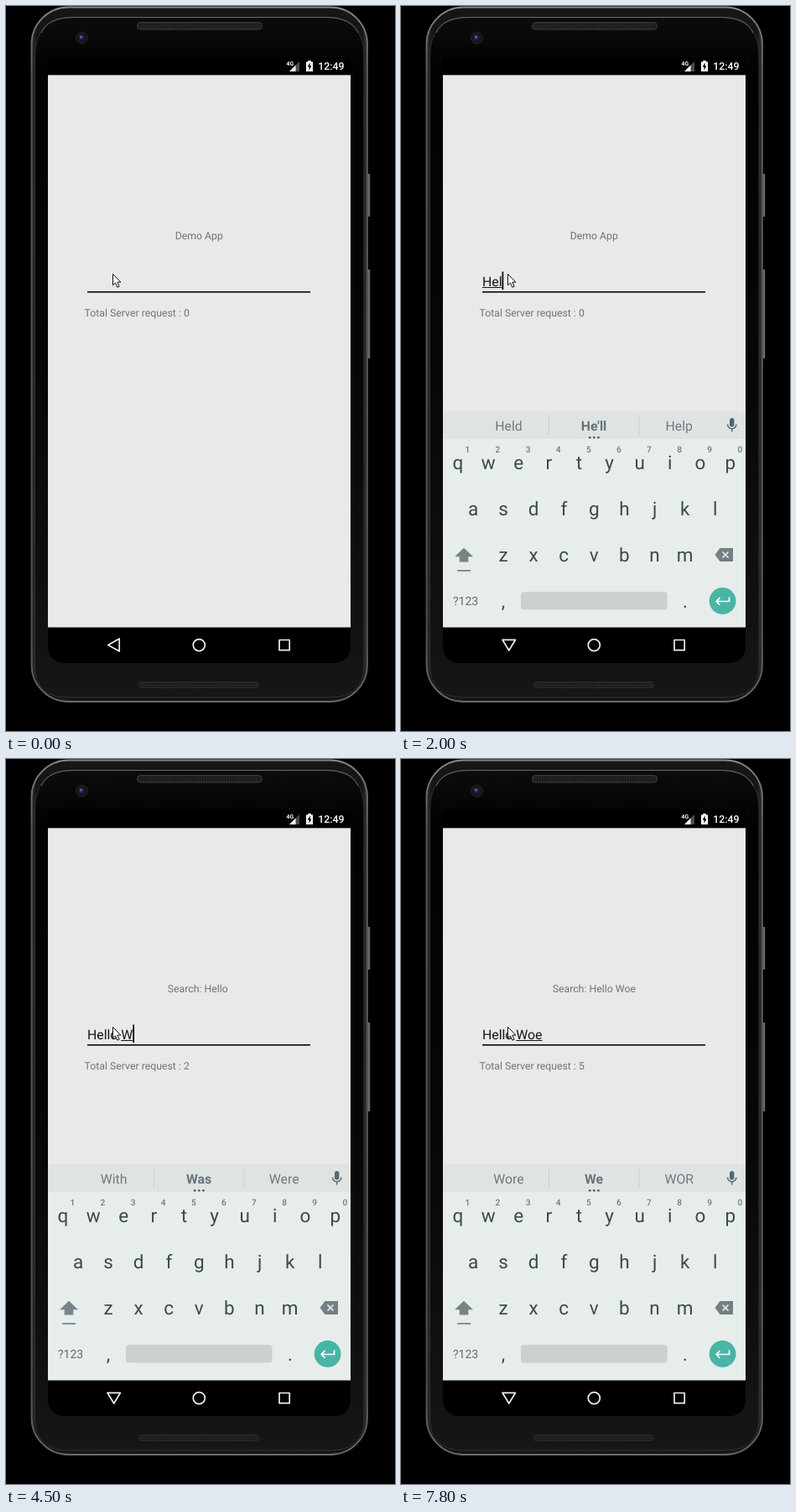
Write an HTML page that moves like this. It is 464 px wide and 864 px high and loops after 8 s.

```html
<!DOCTYPE html>
<html lang="en">
<head>
<meta charset="utf-8">
<title>Search field demo</title>
<style>
  html, body { margin: 0; width: 100%; height: 100%; overflow: hidden; background: #000; }
  svg { display: block; font-family: Roboto, sans-serif; text-rendering: geometricPrecision; }
  .label { font-size: 12.29px; fill: #737372; }
  .input { font-size: 15.8px; fill: #161616; }
  .sug { font-size: 15.8px; fill: #6d7a7f; text-anchor: middle; }
  .sug.main { font-weight: 700; fill: #64737a; }
  .key { font-size: 22.5px; fill: #3a4a51; text-anchor: middle; }
  .hint { font-size: 10.2px; font-weight: 500; fill: #6f7b80; text-anchor: middle; }
  .nav { fill: none; stroke: #efefef; stroke-width: 1.7; stroke-linejoin: round; }
</style>
</head>
<body>
<svg width="464" height="864" viewBox="0 0 464 864">
  <defs>
    <linearGradient id="body" x2="0" y2="1">
      <stop offset="0" stop-color="#0c0c0c"/>
      <stop offset=".08" stop-color="#020202"/>
      <stop offset=".5" stop-color="#060606"/>
      <stop offset=".85" stop-color="#10100e"/>
      <stop offset="1" stop-color="#161614"/>
    </linearGradient>
    <linearGradient id="side">
      <stop offset="0" stop-color="#303030"/>
      <stop offset=".015" stop-color="#161616"/>
      <stop offset=".985" stop-color="#161616"/>
      <stop offset="1" stop-color="#3a3a3a"/>
    </linearGradient>
    <linearGradient id="rim" x2="0" y2="1">
      <stop offset="0" stop-color="#858585"/>
      <stop offset=".1" stop-color="#5a5a5a"/>
      <stop offset=".9" stop-color="#525252"/>
      <stop offset="1" stop-color="#6a6a68"/>
    </linearGradient>
    <pattern id="mesh" width="3" height="3" patternUnits="userSpaceOnUse">
      <rect width="3" height="3" fill="#262624"/>
      <rect width="1.5" height="1.5" fill="#10100f"/>
    </pattern>
  </defs>

  <!-- phone -->
  <rect x="431.500" y="200" width="2.800" height="51" rx="1" fill="#686868"/>
  <rect x="431.500" y="314" width="2.800" height="106" rx="1" fill="#686868"/>
  <rect x="30.500" y="1.500" width="400.500" height="827.500" rx="44" fill="url(#side)" stroke="url(#rim)" stroke-width="1.800"/>
  <path d="M34.500 60Q34.500 14 80 13.500H382Q427 14 427 60V786Q427 824 386 824H75Q34.500 824 34.500 786Z" fill="url(#body)" stroke="#303030"/>
  <path d="M42 32Q50 13.500 80 13.500H382Q412 13.500 420 32" fill="none" stroke="#6a6a6a"/>
  <rect x="156.500" y="19.500" width="149" height="8.500" rx="4" fill="url(#mesh)" stroke="#3a3a38"/>
  <rect x="158.500" y="805.500" width="143" height="7" rx="3" fill="url(#mesh)" stroke="#2b2b29"/>
  <circle cx="90.500" cy="38" r="7" fill="#15161b" stroke="#222226"/>
  <circle cx="90" cy="37.500" r="3.500" fill="#1d2340"/>
  <circle cx="89.500" cy="37" r="1.600" fill="#5565b4"/>
  <path d="M50 61H411V761Q411 783 389 783H72Q50 783 50 761Z"/>

  <!-- status bar -->
  <text x="334.500" y="71.300" font-size="6.800" font-weight="700" fill="#fff">4G</text>
  <path d="M350 66V78H338Z" fill="#4c4c4c"/>
  <path d="M345.500 70.500V78H338Z" fill="#fff"/>
  <path d="M358 66.500H360.300V65H363.700V66.500H366V78H358Z" fill="#fff"/>
  <path d="M362.700 67.500L359.600 72.500H361.500V76.500L364.500 71.500H362.700Z"/>
  <text x="372.300" y="76.300" font-size="12.290" font-weight="500" fill="#fff">12:49</text>

  <!-- app -->
  <rect x="50" y="82.300" width="361" height="660" fill="#e9e9e8"/>
  <text id="label" class="label" x="230.300" y="278" text-anchor="middle"></text>
  <text id="count" class="label" x="93.500" y="369.500"></text>
  <rect x="97" y="340" width="266" height="1.600" fill="#080808"/>
  <text id="input" class="input" x="97" y="333.500"></text>
  <rect id="under" y="335" height="1" fill="#161616"/>
  <rect id="caret" y="316.600" width="1.760" height="21.400" fill="#080808"/>
  <path transform="translate(127.500 319.500)" d="M0 0V13.200L3 10.400L5.300 15.700L7.600 14.700L5.300 9.600H9.400Z" fill="#fff" stroke="#111"/>

  <!-- keyboard -->
  <g id="board">
    <rect x="50" y="483" width="361" height="33" fill="#dfe4e3"/>
    <rect x="50" y="516" width="361" height="226" fill="#e7edeb"/>
    <path d="M176.500 488V511M284 488V511" stroke="#cbd1d1"/>
    <g id="words"></g>
    <g id="dots" fill="#44525a">
      <circle cx="225.200" cy="514.200" r="1.300"/><circle cx="230.300" cy="514.200" r="1.300"/><circle cx="235.400" cy="514.200" r="1.300"/>
    </g>
    <rect x="392" y="491" width="5.400" height="10.500" rx="2.700" fill="#56666d"/>
    <path d="M389.500 498.500A5.200 5.200 0 0 0 399.900 498.500M394.700 503.700V507.500" fill="none" stroke="#56666d" stroke-width="1.500"/>
    <g id="keys"></g>
    <path d="M75 645.700L86 656.300H80.300V662.500H69.700V656.300H64ZM67.300 672H83V673.800H67.300Z" fill="#76848a"/>
    <path d="M380.500 646H396V662H380.500L374.500 654Z" fill="#727f84"/>
    <path d="M383.500 650.500L390.500 657.500M390.500 650.500L383.500 657.500" stroke="#e7edeb" stroke-width="1.700"/>
    <text x="62" y="714.300" font-size="14" fill="#5e6c72">?123</text>
    <rect x="143" y="698.300" width="174.600" height="21.300" rx="3.500" fill="#cdd0d0"/>
    <circle cx="383.600" cy="709" r="15.900" fill="#49b5a5"/>
    <path d="M391.500 704.500V709.500H376.500M380.500 705.200L376.200 709.500L380.500 713.800" fill="none" stroke="#fff" stroke-width="1.700"/>
  </g>

  <!-- navigation bar -->
  <path d="M50 740.600H411V761Q411 783 389 783H72Q50 783 50 761Z"/>
  <path id="back" class="nav"/>
  <circle class="nav" cx="230.300" cy="761.600" r="7"/>
  <rect class="nav" x="326" y="755.500" width="12.200" height="12.200"/>
</svg>
<script>
const LOOP = 8000, LEFT = 97;
const $ = id => document.getElementById(id);
const pen = document.createElement('canvas').getContext('2d');
pen.font = '15.8px Roboto, sans-serif';
pen.textRendering = 'geometricPrecision';
const width = s => pen.measureText(s).width;

function addText(parent, cls, x, y, str = '') {
  const el = document.createElementNS('http://www.w3.org/2000/svg', 'text');
  set(el, { class: cls, x, y });
  el.textContent = str;
  return parent.appendChild(el);
}

function set(el, attrs) {
  for (const name in attrs) el.setAttribute(name, attrs[name]);
}

const PITCH = 36.1;
[['qwertyuiop', 68, 552], ['asdfghjkl', 86, 607], ['zxcvbnm', 122, 662]].forEach(([row, x, y]) =>
  [...row].forEach((ch, i) => addText($('keys'), 'key', x + i * PITCH, y, ch)));
[...'1234567890'].forEach((d, i) => addText($('keys'), 'hint', 79.4 + i * PITCH, 532, d));
addText($('keys'), 'key', 122, 717, ',');
addText($('keys'), 'key', 339, 717, '.');

const words = [128.5, 230, 331.7].map((x, i) =>
  addText($('words'), i === 1 ? 'sug main' : 'sug', x, 506));

// Each step changes part of the state; from = first underlined letter.
const steps = [
  [0, { text: '', from: 0, caret: 0, open: 0, fade: 0, drop: 0, sug: '', label: 'Demo App', n: 0 }],
  [200, { caret: 1 }],
  [300, { open: 1, fade: 0.55, drop: 26 }],
  [400, { fade: 1, drop: 2 }],
  [500, { drop: 0 }],
  [700, { caret: 0 }],
  [1300, { caret: 1 }],
  [1500, { text: 'H' }],
  [1600, { sug: 'His He Had' }],
  [1700, { text: 'He' }],
  [1800, { sug: 'Her He Hey' }],
  [1900, { text: 'Hel' }],
  [2000, { sug: "Held He'll Help" }],
  [2100, { text: 'Hell' }],
  [2300, { text: 'Hello' }],
  [2400, { sug: 'Cello Help Hellos' }],
  [2500, { label: 'Search: Hello', n: 1 }],
  [2900, { caret: 0 }],
  [3300, { caret: 1 }],
  [3500, { text: 'Hello ', from: 6 }],
  [3700, { sug: '' }],
  [3900, { label: 'Search: Hello ', n: 2 }],
  [4100, { caret: 0 }],
  [4400, { text: 'Hello W', caret: 1 }],
  [4500, { sug: 'With Was Were' }],
  [4700, { label: 'Search: Hello W', n: 3 }],
  [5000, { caret: 0 }],
  [5500, { caret: 1 }],
  [6000, { text: 'Hello Wo' }],
  [6100, { sug: 'Who WO Would' }],
  [6300, { label: 'Search: Hello Wo', n: 4 }],
  [6600, { caret: 0 }],
  [7100, { caret: 1 }],
  [7200, { text: 'Hello Woe' }],
  [7300, { sug: 'Wore We WOR' }],
  [7500, { label: 'Search: Hello Woe', n: 5 }],
  [7800, { caret: 0 }]
];

// Non-breaking spaces keep a trailing space in the layout.
const solid = s => s.replace(/ /g, '\u00a0');

function draw(s) {
  $('label').textContent = solid(s.label);
  $('count').textContent = 'Total Server request : ' + s.n;
  $('input').textContent = solid(s.text);
  const end = width(s.text), start = width(s.text.slice(0, s.from));
  set($('under'), { x: LEFT + start, width: Math.max(0, end - start) });
  set($('caret'), { x: LEFT + end, opacity: s.caret });
  set($('board'), { opacity: s.fade, transform: `translate(0 ${s.drop})` });
  set($('back'), { d: s.open ? 'M121 755.3H136.500L128.750 768Z' : 'M121.800 761.600L135.200 754V769.100Z' });
  set($('dots'), { opacity: s.sug ? 1 : 0 });
  const list = s.sug.split(' ');
  words.forEach((el, i) => { el.textContent = list[i] || ''; });
}

let shown = 0;
function tick() {
  const now = performance.now() % LOOP;
  const count = steps.filter(([t]) => t <= now).length;
  if (count !== shown) {
    shown = count;
    draw(Object.assign({}, ...steps.slice(0, count).map(step => step[1])));
  }
  requestAnimationFrame(tick);
}
tick();
</script>
</body>
</html>
```
